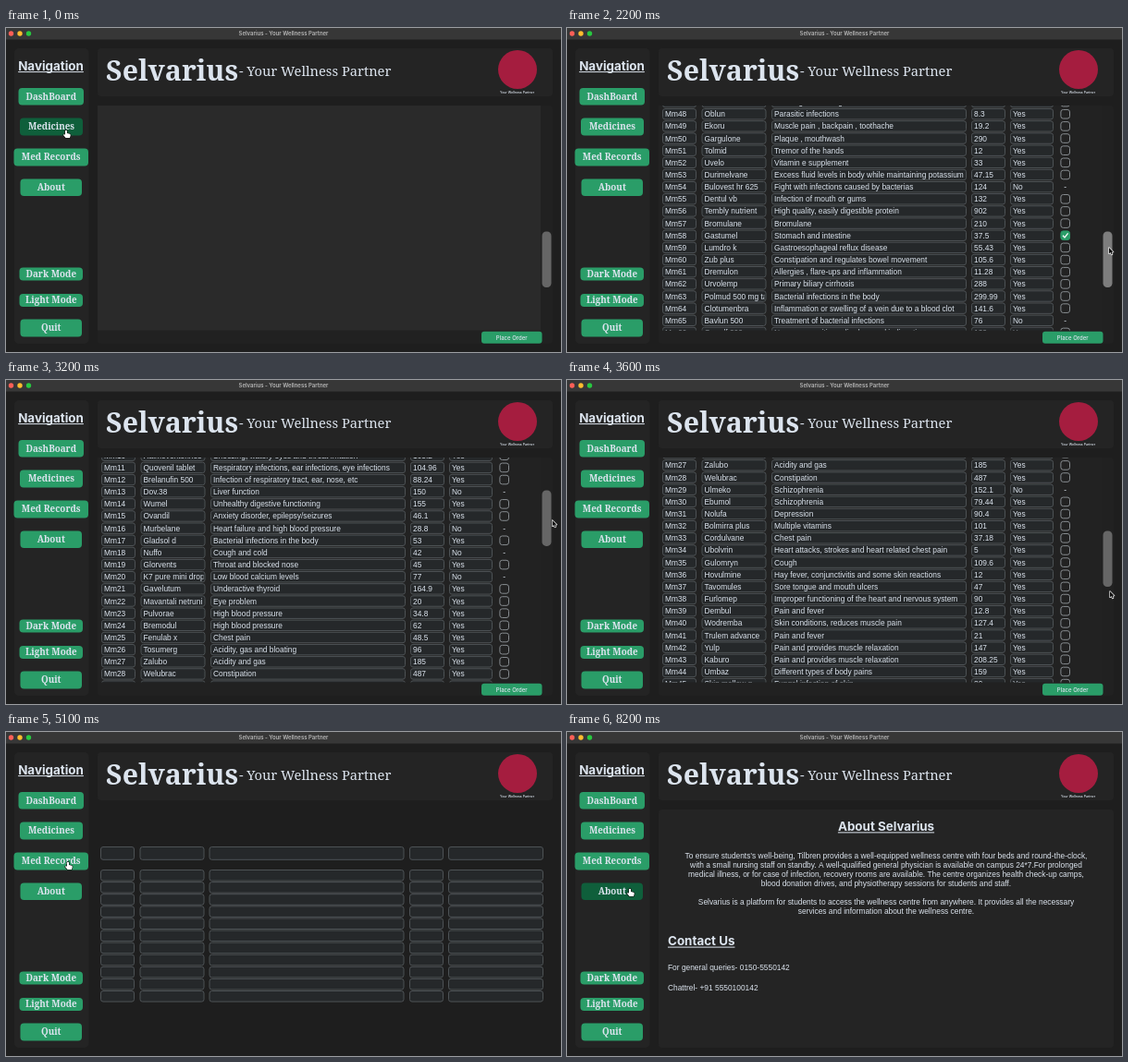
An HTML page with a canvas that plays this animation: 600x351 px, repeating every 8.3 s.

```html
<!DOCTYPE html>
<html lang="en">
<head>
<meta charset="utf-8">
<title>Wellness app</title>
<style>
  html, body { margin: 0; width: 100%; height: 100%; overflow: hidden; background: #1e1e1e; }
  canvas { display: block; width: 600px; height: 351px; }
</style>
</head>
<body>
<canvas id="stage"></canvas>
<script>
const LOOP = 8300, STEP = 100;
const SANS = '"Liberation Sans", Arial, sans-serif';
const UI = 'Inter, sans-serif';
const SLAB = '"Noto Serif", serif';
const INK = '#dce4ee', GREEN = '#2a9d68', DARK_GREEN = '#0f5f3b', PANEL = '#242424';
const BRAND = 'Selvarius', TAGLINE = 'Your Wellness Partner';
const ROW = 13.15, FIRST_ROW = 5, CHECKED_ROW = 58;

const medicines = `Bulen-k4|Eczema|254.15
Durmel|Dermatitis, eczema and allergies|54
Pelumar qx|Cough|92
Tarvole kd|Schizophrenia|25.6|No
Gremule nb|Immunity|179
Halmoventorines|Sneezing, watery eyes and throat irritation|103.2
Quovenil tablet|Respiratory infections, ear infections, eye infections|104.96
Brelanufin 500|Infection of respiratory tract, ear, nose, etc|88.24
Dov.38|Liver function|150|No
Wumel|Unhealthy digestive functioning|155
Ovandil|Anxiety disorder, epilepsy/seizures|46.1
Murbelane|Heart failure and high blood pressure|28.8|No
Gladsol d|Bacterial infections in the body|53
Nuffo|Cough and cold|42|No
Glorvents|Throat and blocked nose|45
K7 pure mini drops|Low blood calcium levels|77|No
Gavelutum|Underactive thyroid|164.9
Mavantali netruni|Eye problem|20
Pulvorae|High blood pressure|34.8
Bremodul|High blood pressure|62
Fenulab x|Chest pain|48.5
Tosumerg|Acidity, gas and bloating|96
Zalubo|Acidity and gas|185
Welubrac|Constipation|487
Ulmeko|Schizophrenia|152.1|No
Ebumol|Schizophrenia|79.44
Nolufa|Depression|90.4
Bolmirra plus|Multiple vitamins|101
Cordulvane|Chest pain|37.18
Ubolvrin|Heart attacks, strokes and heart related chest pain|5
Gulomryn|Cough|109.6
Hovulmine|Hay fever, conjunctivitis and some skin reactions|12
Tavomules|Sore tongue and mouth ulcers|47
Furlomep|Improper functioning of the heart and nervous system|90
Dembul|Pain and fever|12.8
Wodremba|Skin conditions, reduces muscle pain|127.4
Trulem advance|Pain and fever|21
Yulp|Pain and provides muscle relaxation|147
Kaburo|Pain and provides muscle relaxation|208.25
Umbaz|Different types of body pains|159
Skin mellow q|Fungal infection of skin|89
Pradulim|Fungal infection of skin|75
Gumselo|Swelling and itching|64
Oblun|Parasitic infections|8.3
Ekoru|Muscle pain , backpain , toothache|19.2
Gargulone|Plaque , mouthwash|290
Tolmid|Tremor of the hands|12
Uvelo|Vitamin e supplement|33
Durimelvane|Excess fluid levels in body while maintaining potassium levels|47.15
Bulovest hr 625|Fight with infections caused by bacterias|124|No
Dentul vb|Infection of mouth or gums|132
Tembly nutrient|High quality, easily digestible protein|902
Bromulane|Bromulane|210
Gastumel|Stomach and intestine|37.5
Lumdro k|Gastroesophageal reflux disease|55.43
Zub plus|Constipation and regulates bowel movement|105.6
Dremulon|Allergies , flare-ups and inflammation|11.28
Urvolemp|Primary biliary cirrhosis|288
Polmud 500 mg tal|Bacterial infections in the body|299.99
Clotumenbra|Inflammation or swelling of a vein due to a blood clot|141.6
Bavlun 500|Treatment of bacterial infections|76|No
Ormulf 200|Nausea , vomiting , diarrhea and indigestion|120`
  .split('\n').map(line => line.split('|'));

// label, x, y, width, height
const navButtons = [
  ['DashBoard', 13.5, 65, 70.5, 18.5],
  ['Medicines', 15, 97.5, 68, 19],
  ['Med Records', 8.5, 130.5, 80.5, 19],
  ['About', 15.5, 163.5, 66.5, 18.5],
  ['Dark Mode', 14.5, 259.5, 68.5, 14],
  ['Light Mode', 14.5, 288, 68.5, 14],
  ['Quit', 15.5, 315.5, 66.5, 19]
];

// x, width
const medicineCols = [[103, 37], [145.5, 70], [221, 211], [437, 37], [479, 47]];
const recordCols = [[102, 37], [144.5, 70], [219.5, 211], [436, 37], [478, 103]];

// time, x, y
const cursorKeys = [[0, 65, 111], [300, 65, 111], [1800, 586, 238], [2300, 586, 238],
  [2800, 593, 125], [3000, 592, 125], [3600, 587, 229], [4000, 587, 233],
  [4800, 67, 141], [6000, 67, 141], [6400, 68, 170]];
// time, top
const thumbKeys = [[0, 220.5], [2300, 220.5], [2800, 104], [3000, 104], [3600, 163.5], [3800, 211]];

const handShape = new Path2D('M-1 .3q1-1.3 2 0v2.7l3 .8q1 .4.7 1.8l-.7 2.4h-4.4l-2.6-3q0-1.3 2-.4z');
const arrowShape = new Path2D('M0 0v6.5l1.5-1.4 1.1 2.5 1.1-.5-1-2.4h2z');

const canvas = document.getElementById('stage');
const ctx = canvas.getContext('2d');
const scale = window.devicePixelRatio || 1;
canvas.width = 600 * scale;
canvas.height = 351 * scale;

function at(keys, t) {
  const next = keys.findIndex(key => key[0] > t);
  if (next < 0) return keys[keys.length - 1].slice(1);
  const a = keys[next - 1], b = keys[next];
  const p = (t - a[0]) / (b[0] - a[0]), ease = p * p * (3 - 2 * p);
  return a.slice(1).map((v, i) => v + (b[i + 1] - v) * ease);
}

function box(x, y, w, h, r, fill, stroke) {
  ctx.beginPath();
  ctx.roundRect(x, y, w, h, r);
  if (fill) { ctx.fillStyle = fill; ctx.fill(); }
  if (stroke) { ctx.strokeStyle = stroke; ctx.lineWidth = 1; ctx.stroke(); }
}

function disc(x, y, r, fill) {
  ctx.beginPath();
  ctx.arc(x, y, r, 0, 7);
  ctx.fillStyle = fill;
  ctx.fill();
}

function text(str, x, y, font, align = 'left', color = INK) {
  ctx.font = font;
  ctx.textAlign = align;
  ctx.fillStyle = color;
  ctx.fillText(str, x, y);
}

function heading(str, x, y, align) {
  text(str, x, y, `700 13.4px ${UI}`, align);
  const w = ctx.measureText(str).width;
  ctx.fillRect(align === 'center' ? x - w / 2 : x, y + 1.6, w, 1);
}

function cell(x, y, w, h, str) {
  box(x + .5, y + .5, w - 1, h - 1, 2.5, '#25282a', '#4d5255');
  if (!str) return;
  ctx.save();
  ctx.beginPath();
  ctx.rect(x + 2, y, w - 4, h);
  ctx.clip();
  text(str, x + 3, y + h / 2 + 3, `8.4px ${SANS}`);
  ctx.restore();
}

function checkbox(y, checked) {
  box(533.9, y - 4.8, 9.6, 9.6, 2.5, checked ? GREEN : null, checked ? GREEN : '#868b8f');
  if (!checked) return;
  ctx.beginPath();
  ctx.moveTo(536, y);
  ctx.lineTo(538, y + 2.2);
  ctx.lineTo(541.6, y - 2.4);
  ctx.strokeStyle = '#fff';
  ctx.lineWidth = 1.2;
  ctx.stroke();
}

function drawShell(cursor, pressed) {
  ctx.fillStyle = '#1e1e1e';
  ctx.fillRect(0, 0, 600, 351);
  ctx.fillStyle = '#373737';
  ctx.fillRect(0, 0, 600, 12.5);
  ['#ff5f57', '#febc2e', '#28c840'].forEach((c, i) => disc(5.5 + i * 9.5, 6, 2.7, c));
  text(`${BRAND} - ${TAGLINE}`, 300, 8.4, `600 6px ${UI}`, 'center', '#b8b8b8');

  box(9, 22, 80.5, 320, 5, PANEL);
  box(99, 22, 492, 52, 4, PANEL);
  heading('Navigation', 48.5, 45.5, 'center');
  let hovering = false;
  for (const [label, x, y, w, h] of navButtons) {
    const over = cursor[0] > x && cursor[0] < x + w && cursor[1] > y && cursor[1] < y + h;
    hovering ||= over;
    box(x, y, w, h, 4, over && !pressed ? DARK_GREEN : GREEN);
    text(label, x + w / 2, y + h / 2 + 3.4, `700 9.8px ${SLAB}`, 'center');
  }
  text(BRAND, 108, 57, `700 30.2px ${SLAB}`);
  text(`- ${TAGLINE}`, 252, 52.4, `14.7px ${SLAB}`);
  disc(553, 45, 21, '#a51d3f');
  text(TAGLINE, 552.5, 71.4, `500 3.5px ${UI}`, 'center');
  return hovering;
}

function drawMedicines(t, loading) {
  const [thumb] = at(thumbKeys, t);
  const scroll = (thumb - 104) * 4.83 - 24.75;
  box(99, 84, 492, 258, 4, '#212121');
  ctx.save();
  ctx.beginPath();
  ctx.rect(99, 84, 479, 243.5);
  ctx.clip();
  ctx.fillStyle = loading ? '#2a2a2a' : '#222';
  ctx.fillRect(99, 84, 479, 244);
  if (!loading) medicines.forEach(([name, use, price, stock = 'Yes'], i) => {
    const id = i + FIRST_ROW, y = id * ROW - scroll;
    if (y < 70 || y > 342) return;
    const values = ['Mm' + String(id).padStart(2, '0'), name, use, price, stock];
    medicineCols.forEach(([x, w], c) => cell(x, y - 6.2, w, 12.4, values[c]));
    if (stock === 'Yes') checkbox(y, id === CHECKED_ROW);
    else text('-', 538.7, y + 3, `8.4px ${SANS}`, 'center');
  });
  ctx.restore();
  box(579.5, thumb, 10, 60.5, 4.5, t >= 1800 && t < 2700 ? '#7d7d7d' : '#666');
  box(514, 328.8, 65.5, 13, 3, GREEN);
  text('Place Order', 546.7, 337.5, `500 6px ${UI}`, 'center');
}

function drawRecords() {
  for (const [x, w] of recordCols) {
    cell(x, 124, w, 14.8);
    for (let i = 0; i < 11; i++) cell(x, 149 + i * 13.1, w, 12.6);
  }
}

function drawAbout() {
  box(99, 84, 492, 258, 4, PANEL);
  const font = `8.4px ${SANS}`;
  heading(`About ${BRAND}`, 345, 106.8, 'center');
  [
    'To ensure students’s well-being, Tilbren provides a well-equipped wellness centre with four beds and round-the-clock,',
    'with a small nursing staff on standby. A well-qualified general physician is available on campus 24*7.For prolonged',
    'medical illness, or for case of infection, recovery rooms are available. The centre organizes health check-up camps,',
    'blood donation drives, and physiotherapy sessions for students and staff.',
    '',
    `${BRAND} is a platform for students to access the wellness centre from anywhere. It provides all the necessary`,
    'services and information about the wellness centre.'
  ].forEach((line, i) => text(line, 345, 136.8 + i * 9.95, font, 'center'));
  heading('Contact Us', 109, 231, 'left');
  text('For general queries- 0150-5550142', 109, 257.8, font);
  text('Chattrel- +91 5550100142', 109, 280.3, font);
}

function drawCursor([x, y], hand) {
  ctx.save();
  ctx.translate(x, y);
  ctx.lineWidth = 1.2;
  ctx.lineJoin = 'round';
  ctx.strokeStyle = hand ? '#111' : '#fff';
  ctx.fillStyle = hand ? '#fff' : '#111';
  const shape = hand ? handShape : arrowShape;
  ctx.stroke(shape);
  ctx.fill(shape);
  ctx.restore();
}

function render(t) {
  ctx.setTransform(scale, 0, 0, scale, 0, 0);
  const cursor = at(cursorKeys, t);
  const pressed = (t >= 5000 && t < 5200) || (t >= 6600 && t < 6800);
  const hand = drawShell(cursor, pressed);
  if (t < 5000) drawMedicines(t, t < 200);
  else if (t < 6600) drawRecords();
  else if (t >= 6800) drawAbout();
  drawCursor(cursor, hand);
}

function tick() {
  const t = performance.now() % LOOP;
  render(Math.floor(t / STEP) * STEP);
  requestAnimationFrame(tick);
}
tick();
</script>
</body>
</html>
```
